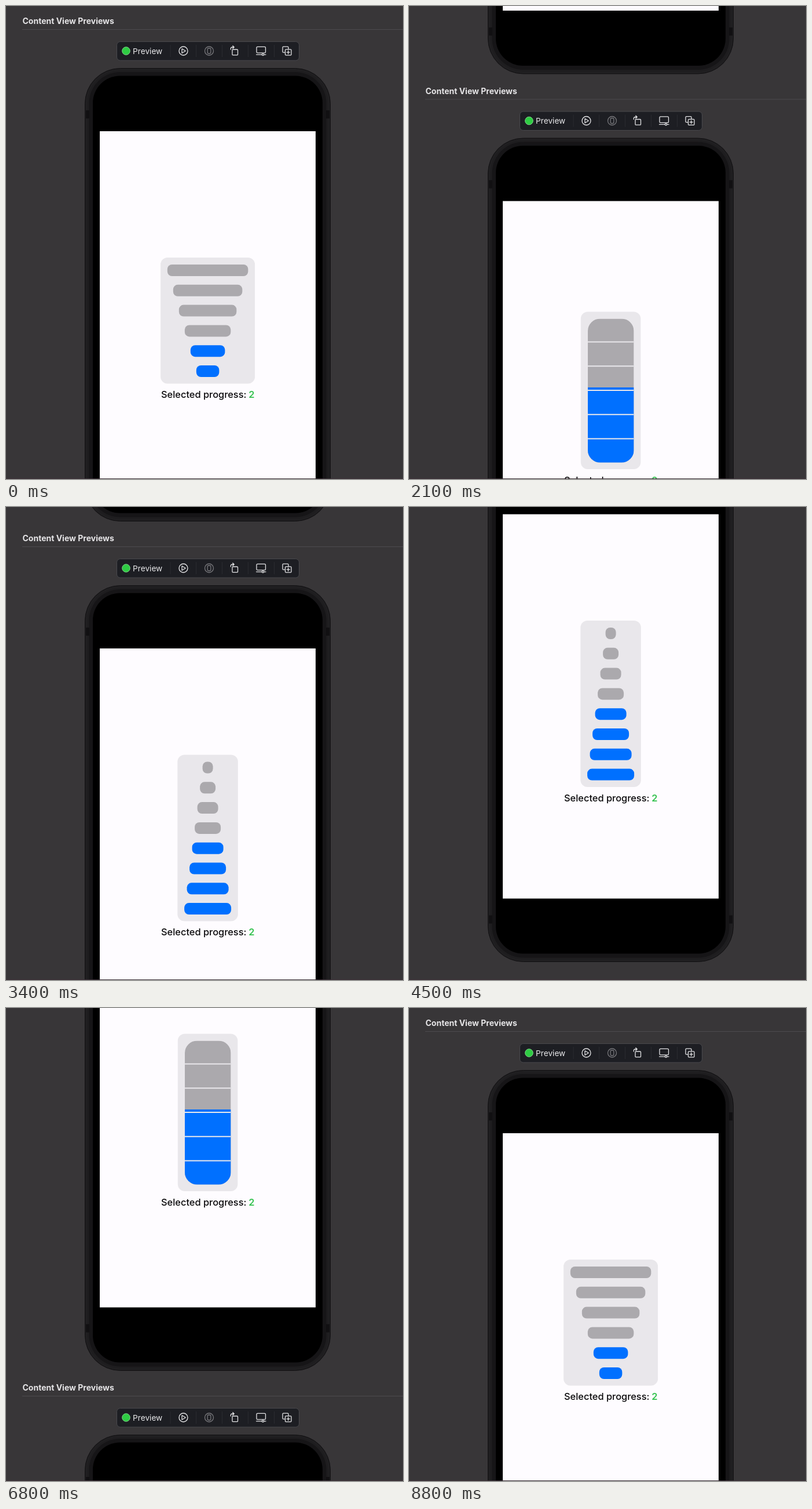
Write an HTML page that moves like this. It is 686 px wide and 816 px high and loops after 8.9 s.

```html
<!DOCTYPE html>
<html lang="en">
<head>
<meta charset="utf-8">
<title>Progress previews</title>
<style>
  html, body { margin: 0; width: 100%; height: 100%; overflow: hidden; background: #383638; }
  svg { display: block; width: 686px; height: 816px; font-family: Inter, Roboto, sans-serif; }
  .icon { fill: none; stroke: #e4e4e6; stroke-width: 1.3; stroke-linecap: round; stroke-linejoin: round; }
  .dim { stroke: #77777b; }
  .label { font-size: 16.4px; font-weight: 500; fill: #0b0a0c; }
  .value { font-weight: 600; fill: #35c250; text-anchor: end; }
</style>
</head>
<body>
<svg viewBox="0 0 686 816">
  <defs>
    <!-- Origin: top edge of the phone's white screen -->
    <g id="frame">
      <text x="28.5" y="-185" font-size="14" font-weight="700" fill="#e6e5e7">Content View Previews</text>
      <path d="M28 -175.5H686" stroke="#4d4b4e"/>

      <rect x="191.5" y="-154.5" width="315" height="32.5" rx="6" fill="#1d1e23" stroke="#48484c"/>
      <circle cx="207.5" cy="-138.5" r="6.8" fill="#2ecc43" stroke="#7fd98a"/>
      <text x="219" y="-133.5" font-size="13.7" fill="#e8e8ea">Preview</text>
      <path d="M284 -149v21M328.5 -149v21M373.5 -149v21M418.5 -149v21M463.5 -149v21" stroke="#2a2b30"/>
      <g class="icon" transform="translate(0 -138.5)">
        <circle cx="306.5" cy="0" r="7.5"/>
        <path d="M304 -3.7L310.3 0L304 3.7Z"/>
        <g class="dim">
          <circle cx="351" cy="0" r="7.5"/>
          <rect x="348.2" y="-4.5" width="5.6" height="9" rx="1.4"/>
        </g>
        <rect x="391" y="-2.5" width="9.5" height="9.7" rx="1.3"/>
        <path d="M388.3 -2.5V-3.5Q388.3 -6.5 391.3 -6.5H394M391.8 -8.8L394.2 -6.5L391.8 -4.2"/>
        <rect x="433" y="-7.2" width="15.5" height="10.6" rx="1.6"/>
        <path d="M432.5 6.3H442M446 6.3H449"/>
        <circle cx="444" cy="6.3" r="1.6"/>
        <path d="M482 2.6H479.3Q478 2.6 478 1.3V-6Q478 -7.3 479.3 -7.3H486.6Q488 -7.3 488 -6V-3"/>
        <rect x="482.5" y="-2.7" width="10.5" height="10" rx="1.4"/>
        <path d="M487.7 -.3V4.9M485.1 2.3H490.3"/>
      </g>

      <rect x="136.5" y="-108.5" width="424" height="880.5" rx="61" fill="#1e1d1f" stroke="#121113"/>
      <rect x="139" y="-106" width="419" height="875.5" rx="58" fill="none" stroke="#232224"/>
      <rect x="143.5" y="-102" width="410" height="867" rx="54" fill="#161517"/>
      <path d="M138 -36h6v14h-6zM553 -36h6v14h-6zM138 692h6v14h-6zM553 692h6v14h-6z" fill="#111012"/>
      <rect x="150" y="-95.5" width="397" height="853.5" rx="47"/>
      <rect x="162" y="0" width="373" height="663" fill="#fefcff"/>
    </g>
    <clipPath id="tank"><rect x="309" y="203" width="79.5" height="248" rx="21"/></clipPath>
  </defs>
  <g id="pages"></g>
  <path d="M0 815.5H686" stroke="#3b2f37"/>
</svg>
<script>
  const LOOP = 8900, TICK = 100, PITCH = 991.5, FIRST_TOP = 216, CENTER = 348.6;
  const GRAY = '#aba9ad', BLUE = '#0070ff', PANEL = '#e9e7eb';
  const pages = document.getElementById('pages');

  const rect = (width, height, y, fill, rx = 0) =>
    `<rect x="${CENTER - width / 2}" y="${y}" width="${width}" height="${height}" rx="${rx}" fill="${fill}"/>`;

  const panel = (width, top, bottom) => rect(width, bottom - top, top, PANEL, 12);

  const label = y =>
    `<text class="label" x="268" y="${y}">Selected progress:</text>
     <text class="label value" x="429.5" y="${y}">2</text>`;

  const bars = (count, filled, top, width, step) =>
    Array.from({ length: count }, (_, i) =>
      rect(width + step * i, 20, top + 34.8 * i, i < count - filled ? GRAY : BLUE, 8)).join('');

  const tank = () => {
    const gaps = Array.from({ length: 5 }, (_, i) => rect(80, 2, 242 + 41.75 * i, PANEL)).join('');
    return `<g clip-path="url(#tank)">${rect(80, 248, 203, GRAY)}${rect(80, 130, 321.5, BLUE)}${gaps}</g>`;
  };

  const contents = [
    panel(163, 218, 435.5) + bars(6, 2, 230, 139.5, -20) + label(460),
    panel(103.5, 191, 462.5) + tank() + label(487),
    panel(104.5, 183.5, 470.5) + bars(8, 4, 195.5, 18, 9) + label(495)
  ];
  pages.innerHTML = contents.map((content, i) =>
    `<g transform="translate(0 ${FIRST_TOP + PITCH * i})"><use href="#frame"/>${content}</g>`).join('');

  // Scroll stops: [time in ms, offset in px], joined by a monotone cubic
  const stops = [[0, 0], [2100, 871], [3400, 1955], [4500, 2186.5],
                 [4800, 2186.5], [5900, 1833.5], [7800, 704], [8800, 0]];
  const rise = i => (stops[i + 1][1] - stops[i][1]) / (stops[i + 1][0] - stops[i][0]);
  const slopes = stops.map((_, i) => {
    if (i === 0 || i === stops.length - 1) return 0;
    const a = rise(i - 1), b = rise(i);
    return a * b > 0 ? 2 * a * b / (a + b) : 0;
  });

  function scrollAt(time) {
    const next = stops.findIndex(([t]) => t > time);
    if (next < 0) return 0;
    const [t0, y0] = stops[next - 1], [t1, y1] = stops[next];
    const span = t1 - t0, u = (time - t0) / span, v = 1 - u;
    return y0 * (1 + 2 * u) * v * v + y1 * u * u * (3 - 2 * u)
      + span * u * v * (slopes[next - 1] * v - slopes[next] * u);
  }

  const start = performance.now();
  function draw() {
    const time = (performance.now() - start) % LOOP;
    const offset = scrollAt(Math.floor(time / TICK) * TICK);
    pages.setAttribute('transform', `translate(0 ${-offset.toFixed(1)})`);
    requestAnimationFrame(draw);
  }
  draw();
</script>
</body>
</html>
```
